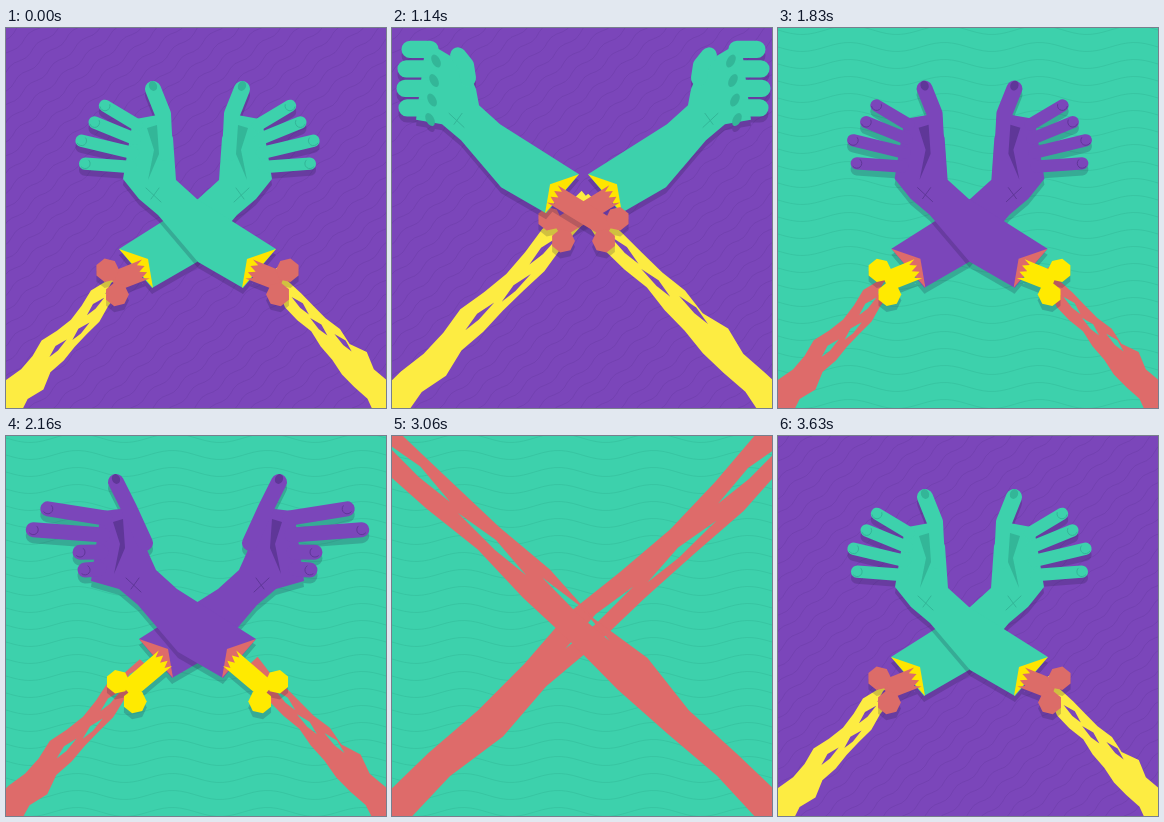
An HTML page with a canvas that plays this animation: 380 px wide and 380 px high, repeating every 3660 ms.

```html
<!DOCTYPE html>
<html lang="en">
<head>
<meta charset="utf-8">
<title>Crossed arms</title>
<style>
html, body { margin: 0; width: 100%; height: 100%; overflow: hidden; background: #7b46ba; }
canvas { display: block; }
</style>
</head>
<body>
<canvas id="stage" width="380" height="380"></canvas>
<script>
const SIZE = 380, MIRROR = 383, LOOP = 3660, STEP = 30, ENTER = -480;
const ctx = document.getElementById('stage').getContext('2d');
const layer = document.createElement('canvas');
layer.width = layer.height = SIZE;
const pen = layer.getContext('2d');

const scenes = [
  { start: 0, bg: '#7b46ba', line: '#673aa0', skin: '#3dd1ac', detail: '#33b698',
    goo: '#fdec42', face: '#ffe500', bone: '#dc6c68',
    wave: { tilt: -0.7, length: 34, height: 2, gap: 13 } },
  { start: 1800, bg: '#3dd1ac', line: '#2fae90', skin: '#7b46ba', detail: '#5f3798',
    goo: '#de6b6a', face: '#de6b6a', bone: '#ffea00',
    wave: { tilt: 0, length: 95, height: 4.5, gap: 17 } }
];

// Thumb tip, thumb knuckle, index base, finger gap, first and last angle, four lengths.
const relaxed = [235, 64, 217, 90, 244, 99, 17, -0.22, 0.26, 36, 41, 38, 29];
const open = [236, 61, 226, 86, 256, 97, 14, -0.6, -0.08, 34, 40, 49, 42];
const pointing = [253, 64, 240, 90, 268, 100, 17, -0.17, 0.1, 54, 66, 17, 10];
const closing = [234, 82, 226, 98, 262, 85, 21, -0.15, 0.1, 22, 14, 14, 13];
const fist = [234, 102, 226, 112, 266, 96, 19.5, 0, 0, 16, 18, 17, 13];
const poses = [relaxed, open, pointing, closing, fist];

const mix = (a, b, k) => a + (b - a) * k;
const random = n => Math.abs(Math.sin(n * 127.1) * 43758.5) % 1;
const range = (n, make) => Array.from({ length: n }, (_, i) => make(i));

// Eased value from [time, value] pairs.
function key(t, ...stops) {
  const next = stops.findIndex(([time]) => t < time);
  if (next < 0) return stops[stops.length - 1][1];
  if (next === 0) return stops[0][1];
  const [t0, v0] = stops[next - 1], [t1, v1] = stops[next];
  const k = (t - t0) / (t1 - t0);
  return mix(v0, v1, k * k * (3 - 2 * k));
}

function trace(c, points) {
  points.forEach(([x, y], i) => i ? c.lineTo(x, y) : c.moveTo(x, y));
}

function fill(c, color, ...shapes) {
  c.fillStyle = color;
  c.beginPath();
  for (const shape of shapes) {
    trace(c, shape);
    c.closePath();
  }
  c.fill('evenodd');
}

function stroke(c, color, width, ...lines) {
  c.strokeStyle = color;
  c.lineWidth = width;
  c.beginPath();
  lines.forEach(line => trace(c, line));
  c.stroke();
}

function ellipse(c, color, x, y, rx, ry, turn = 0) {
  c.fillStyle = color;
  c.beginPath();
  c.ellipse(x, y, rx, ry, turn, 0, 2 * Math.PI);
  c.fill();
}

function drawBackground({ bg, line, wave }) {
  ctx.fillStyle = bg;
  ctx.fillRect(0, 0, SIZE, SIZE);
  ctx.save();
  ctx.translate(190, 190);
  ctx.rotate(wave.tilt);
  ctx.globalAlpha = 0.5;
  stroke(ctx, line, 0.7, ...range(42, row => range(92, i => {
    const x = i * 6 - 273;
    return [x, row * wave.gap - 273 + wave.height * Math.sin(x * 2 * Math.PI / wave.length)];
  })));
  ctx.restore();
}

function armAt(p) {
  const pose = key(p, [-250, 0], [-60, 1], [30, 1], [360, 2], [600, 3], [840, 4]);
  const from = Math.min(3, Math.floor(pose));
  const away = 205 * Math.max(0, (-p - 30) / 300) ** 1.6;
  const push = key(p, [0, 0], [360, 20], [600, 0], [870, -2], [1080, -14], [1260, 360]);
  return {
    hand: poses[from].map((v, i) => mix(v, poses[from + 1][i], pose - from)),
    x: push - away * 0.946,
    y: away * 1.06 - push * 0.9,
    boneX: 107 + key(p, [0, 0], [360, -6], [600, -34], [870, -7], [1080, -25]),
    boneY: 254 + key(p, [0, 0], [360, 19], [600, 19], [870, 14], [1080, 22]),
    grip: Math.max(0, Math.min(1, pose - 2)),
    fly: Math.max(0, push - 20) / 340
  };
}

// A ragged band with slits, stretched from the corner to the stump.
function drawGoo(c, s, arm, flipped) {
  const dx = 118 + arm.x, dy = arm.y - 130, length = Math.hypot(dx, dy);
  if (dx < 20) return;
  const seed = flipped ? 40 : 7;
  const at = (u, v) => {
    const side = v * (1 + arm.fly * u) / length;
    return [dx * u - dy * side, 375 + dy * u + dx * side];
  };
  const edge = side => range(12, i =>
    at(i / 10 - 0.1, side * (mix(18, 10, i / 11) + 8 * random(seed + i * side) - 5)));
  const slits = range(4, i => {
    const u = 0.36 + i * 0.16, v = 14 * random(seed + i * 3) - 7;
    return [at(u, v), at(u + 0.07, v - 3), at(u + 0.14, v + 1), at(u + 0.06, v + 2)];
  });
  fill(c, s.goo, [...edge(-1), ...edge(1).reverse()], ...slits);
}

function drawBone(c, color, { boneX, boneY }) {
  const dx = 137 - boneX, dy = 242 - boneY, length = Math.hypot(dx, dy);
  const at = (along, side) => [
    boneX + (dx * along - dy * side) / length,
    boneY + (dy * along + dx * side) / length
  ];
  const teeth = range(7, i => at(length + (i % 2 ? -4 : 3), i * 3.4 - 10));
  fill(c, color, [at(0, -10), ...teeth, at(0, 10)]);
  for (const side of [-13, 13]) {
    const [x, y] = at(-1, side);
    fill(c, color, range(7, i => {
      const a = i * 2 * Math.PI / 7;
      return [x + 12 * Math.cos(a), y + 12 * Math.sin(a)];
    }));
  }
}

function drawHand(c, { skin, detail }, { hand, grip }) {
  const [tipX, tipY, kneeX, kneeY, baseX, baseY, gap, first, last, ...lengths] = hand;
  const fingers = lengths.map((length, i) => {
    const x = baseX + i * 2, y = baseY + i * gap, a = mix(first, last, i / 3);
    return { x, y, a, endX: x + length * Math.cos(a), endY: y + length * Math.sin(a) };
  });
  const pinky = fingers[3];
  c.lineCap = c.lineJoin = 'round';
  fill(c, skin, [[113, 221], [192, 171], [213, 152], [kneeX - 10, kneeY + 24], [kneeX, kneeY],
    [baseX, baseY - gap * 0.4], [pinky.x + 4, pinky.y + 12], [250, 171], [231, 187], [191, 234], [146, 260]]);
  stroke(c, skin, 16, [[tipX, tipY], [kneeX, kneeY], [224, 125]]);
  stroke(c, skin, gap * 0.88, ...fingers.map(f => [[f.x - 4, f.y], [f.endX, f.endY]]));

  stroke(c, detail, 1, [[228, 174], [243, 160]], [[230, 160], [238, 171]]);
  c.globalAlpha = 1 - grip;
  ellipse(c, detail, tipX, tipY - 3, 4, 5, 0.4);
  fill(c, detail, [[kneeX + 6, kneeY + 11], [kneeX + 16, kneeY + 14], [kneeX + 9, kneeY + 36],
    [kneeX + 15, kneeY + 66], [kneeX + 4, kneeY + 40]]);
  for (const f of fingers) {
    c.beginPath();
    c.arc(f.endX, f.endY, 5, f.a + 0.8, f.a + 4);
    c.stroke();
  }
  c.globalAlpha = grip;
  fingers.forEach(f => ellipse(c, detail, f.x - 10, f.y + gap * 0.6, 4, 7, 0.5));
  c.globalAlpha = 1;
}

function drawArm(c, s, arm) {
  c.translate(arm.x, arm.y);
  drawHand(c, s, arm);
  fill(c, s.face, [[113, 221], [142, 231], [147, 260]]);
  drawBone(c, s.bone, arm);
}

// Paints one part on the layer, then places it with an optional hard shadow.
function place(draw, s, arm, flipped, shadow) {
  pen.clearRect(0, 0, SIZE, SIZE);
  pen.save();
  if (flipped) pen.transform(-1, 0, 0, 1, MIRROR, 0);
  draw(pen, s, arm, flipped);
  pen.restore();
  ctx.save();
  if (shadow) {
    ctx.shadowColor = 'rgba(30, 20, 60, 0.2)';
    ctx.shadowOffsetY = 6;
  }
  ctx.drawImage(layer, 0, 0);
  ctx.restore();
}

function drawScene(s, p) {
  ctx.save();
  if (p < -150) {
    const size = key(p, [ENTER, 0], [-345, 344], [-270, 338], [-150, 420]);
    ctx.beginPath();
    ctx.rect(190.5 - size / 2, 188 - size / 2, size, size);
    ctx.clip();
  }
  drawBackground(s);
  const arm = armAt(p);
  for (const flipped of [false, true]) place(drawGoo, s, arm, flipped, false);
  for (const flipped of [false, true]) place(drawArm, s, arm, flipped, true);
  ctx.restore();
}

const begin = performance.now();
function frame() {
  const t = Math.floor((performance.now() - begin) % LOOP / STEP) * STEP;
  scenes
    .map(s => ({ s, p: (t - s.start - ENTER + LOOP) % LOOP + ENTER }))
    .sort((a, b) => b.p - a.p)
    .forEach(({ s, p }) => drawScene(s, p));
  requestAnimationFrame(frame);
}
frame();
</script>
</body>
</html>
```
